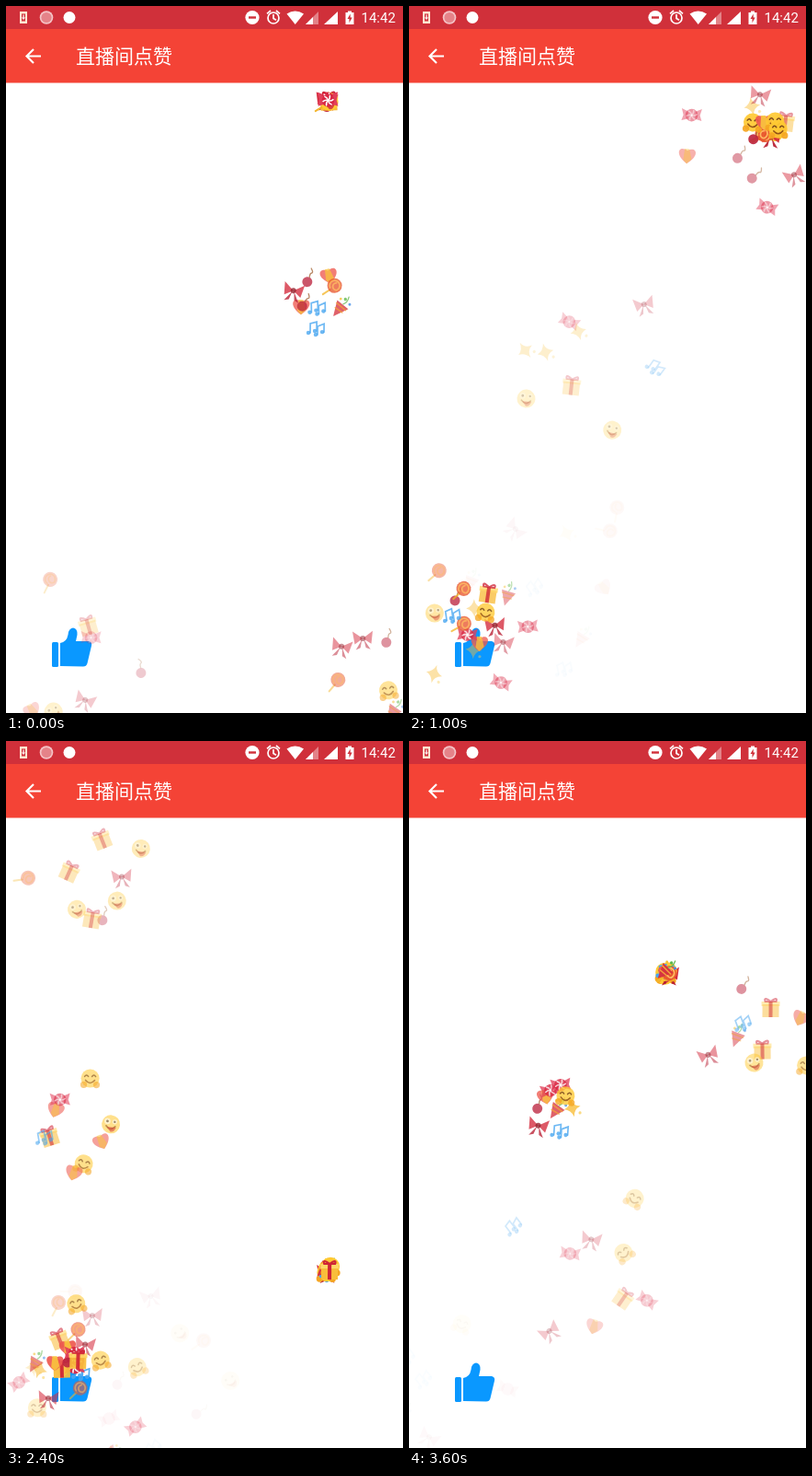
An HTML page with a canvas that plays this animation: 432 by 768 pixels, repeating every 3.7 s.

```html
<!DOCTYPE html>
<html lang="zh">
<head>
<meta charset="utf-8">
<title>直播间点赞</title>
<style>
  html, body { margin: 0; width: 432px; height: 768px; overflow: hidden; background: #fff; }
  svg, canvas { position: absolute; left: 0; top: 0; display: block; }
  .clock { font: 15px Roboto, sans-serif; }
  .title { font: 21px "Noto Sans CJK SC", "Noto Sans CJK", sans-serif; }
</style>
</head>
<body>
<svg width="432" height="768" viewBox="0 0 432 768">
  <rect width="432" height="83.500" fill="#f44336"/>
  <rect width="432" height="25" fill="#d0303a"/>
  <g fill="#fff">
    <path d="M15 6h8v13h-8z M17 8.500v8h4v-8z" fill="#ffe9d2" fill-rule="evenodd"/>
    <path d="M18.400 9.500h1.200v3h1.500L19 15l-2.100-2.500h1.500z"/>
    <circle cx="44" cy="12.500" r="7.300" fill="#f4c3c6"/>
    <circle cx="44" cy="12.500" r="5.600" fill="#e58389"/>
    <circle cx="69" cy="12.500" r="6.500"/>
    <circle cx="268" cy="12.500" r="7.600"/>
    <path d="M264 11.300h8v2.400h-8z" fill="#d0303a"/>
    <g fill="none" stroke="#fff" stroke-width="1.700">
      <circle cx="291" cy="13" r="6"/>
      <path d="M291 9v4.500l3 1.800M284 8.300l4-3.300M298 8.300l-4-3.300"/>
    </g>
    <path d="M305.500 8.500Q314.500 2.500 324 8.500L314.700 20z"/>
    <path d="M326 20L340 6v14z" opacity=".4"/>
    <path d="M326 20l8-8v8z"/>
    <path d="M346 20L361 6v14z"/>
    <path d="M369.500 7h2.500V5.500h4V7h2.500v13h-9z"/>
    <path d="M374.700 8.500l-3.200 5.500h2v4.200l3.200-5.700h-2z" fill="#d0303a"/>
    <text class="clock" x="386.500" y="18">14:42</text>
    <text class="title" x="76" y="62">直播间点赞</text>
  </g>
  <path d="M38 54.500H23M30 47l-7.500 7.500L30 62" fill="none" stroke="#fff" stroke-width="2.200"/>
  <g fill="#0a98ff">
    <rect x="50" y="691" width="7" height="27" rx="1.500"/>
    <path d="M59 717V692Q66 691 67.500 683Q68 676 73 675.500Q78 676 77.500 683L76 690H90Q94 691 93 695L88.500 714Q87.500 717.500 84 717.500z"/>
  </g>
</svg>
<canvas id="stage" width="432" height="768"></canvas>
<script>
const LOOP = 3700, STEP = 100, LIFE = 850, FALL = 380, PIECES = 9;
const ctx = document.getElementById('stage').getContext('2d');

let seed = 41;
const rand = () => (seed = seed * 16807 % 2147483647) / 2147483647;
const spread = r => (rand() * 2 - 1) * r;

function dot(x, y, r, color) {
  ctx.fillStyle = color;
  ctx.beginPath();
  ctx.arc(x, y, r, 0, 7);
  ctx.fill();
}
function fill(d, color) {
  ctx.fillStyle = color;
  ctx.fill(new Path2D(d));
}
function line(d, color, width) {
  ctx.strokeStyle = color;
  ctx.lineWidth = width;
  ctx.stroke(new Path2D(d));
}
function face() {
  dot(0, 0, 10, '#ffc933');
  line('M-5 2Q0 8 5 2', '#8a4a16', 1.6);
}

const draw = {
  candy() {
    fill('M-4-4L-11-7L-9 0L-11 6L-4 4zM4-4L11-7L9 0L11 6L4 4z', '#e2405a');
    dot(0, 0, 6.8, '#d92843');
    for (let i = 0; i < 6; i++) {
      ctx.rotate(Math.PI / 3);
      line('M0 0Q3 1 5.500-1', '#fff', 1.5);
    }
  },
  lolly() {
    line('M-5 4L-13 9', '#f3b62c', 2);
    dot(0, 0, 8, '#e8572f');
    line('M-5 2A5.500 5.500 0 1 1 2 5A4 4 0 1 1 2-3', '#ffbd63', 1.8);
  },
  smile() {
    face();
    line('M-6-2Q-4-5-2-2M2-2Q4-5 6-2', '#70401a', 1.5);
    dot(-7, 7, 3.6, '#f5a623');
    dot(7, 7, 3.6, '#f5a623');
  },
  goofy() {
    face();
    dot(-4, -3, 3.3, '#fff');
    dot(4, -3, 2.6, '#fff');
    dot(-4, -3, 1.4, '#53381f');
    dot(4, -3, 1.2, '#53381f');
    fill('M-4 3H6Q4 9 0 8z', '#d8433c');
  },
  gift() {
    fill('M-9-4H9V10H-9z', '#f9bd3b');
    fill('M-10-7H10V-2H-10z', '#ffd766');
    fill('M-2-7H2V10H-2z', '#cf2436');
    line('M0-7Q-8-13-6-7zM0-7Q8-13 6-7z', '#cf2436', 2);
  },
  heart() {
    fill('M0 9C-15-1-9-11 0-5C9-11 15-1 0 9z', '#ee5a50');
    fill('M-3-7H2L5 4L0 9L-4 5z', '#f8c33f');
  },
  balloon() {
    dot(-2, 4, 5.5, '#bd2740');
    line('M1-1Q2-5 4-5T4-10', '#a5683c', 1.3);
  },
  notes() {
    line('M-6 6V-4L1-6V4M2 8V-1L9-4V5', '#47a5f0', 1.7);
    for (const [x, y] of [[-8, 6], [-1, 4], [0, 8], [7, 5]]) dot(x, y, 2.2, '#47a5f0');
  },
  bow() {
    fill('M0-1L-11-9L-9 5zM0-1L11-9L9 5z', '#d42a3c');
    fill('M-1 0L-8 11L-3 9zM1 0L8 11L3 9z', '#b91f33');
    dot(0, -1, 3, '#93202c');
  },
  popper() {
    fill('M-9 9L-3-8L8 3z', '#d63440');
    line('M-6 0L1 6M-4-5L5 4', '#f3a13b', 1.5);
    dot(6, -8, 1.7, '#5db84d');
    dot(10, -2, 1.5, '#438ee8');
    dot(1, -9, 1.4, '#f4bd2e');
    line('M3-3Q8-4 10-10', '#6bb956', 1.3);
  },
  sparkle() {
    fill('M0-10Q1-2 9 0Q1 2 0 10Q-2 2-9 0Q-2-2 0-10z', '#f8bd36');
    dot(7, 7, 1.6, '#f8d060');
  }
};
const kinds = Object.keys(draw);
const pieces = [];

// Pieces leave (x, y) in every direction, lifted upwards; `top` covers the pile.
function burst(birth, x, y, top, lift = 100) {
  for (let i = 0; i < PIECES; i++) {
    const angle = (i + rand()) / PIECES * Math.PI * 2;
    const speed = 40 + rand() * 130;
    const kind = i === PIECES - 1 ? top : kinds[Math.floor(rand() * kinds.length)];
    pieces.push({
      birth, kind,
      x: x + spread(3),
      y: y + spread(3),
      vx: Math.cos(angle) * speed,
      vy: Math.sin(angle) * speed - lift,
      spin: spread(1.1)
    });
  }
}

// Taps around the screen: time, place and the piece on top.
burst(-400, 410, 685, 'gift');
burst(-200, 335, 325, 'lolly');
burst(-20, 350, 105, 'candy');
burst(200, 170, 440, 'lolly');
burst(400, 174, 310, 'bow');
burst(580, 371, 125, 'gift');
burst(900, 390, 140, 'smile');
burst(1100, 213, 440, 'popper');
burst(1290, 251, 606, 'smile');
burst(1600, 175, 520, 'lolly');
burst(1880, 99, 116, 'bow');
burst(2050, 70, 405, 'goofy');
burst(2380, 350, 576, 'gift');
burst(2550, 110, 235, 'candy');
burst(2790, 29, 554, 'candy');
burst(3000, 205, 490, 'smile');
burst(3200, 375, 300, 'heart');
burst(3400, 158, 395, 'smile');
burst(3590, 280, 253, 'popper');

// The like button: one early tap, then a steady run.
const like = (birth, top) => burst(birth, 70, 688, top, 200);
like(-600, 'candy');
for (let i = 0; i < 9; i++) like(550 + i * 250, ['candy', 'smile', 'bow', 'gift'][i % 4]);

function render(ms) {
  ctx.clearRect(0, 0, 432, 768);
  ctx.lineCap = 'round';
  for (const p of pieces) {
    const age = ms - p.birth;
    if (age < 0 || age >= LIFE) continue;
    const t = age / 1000;
    ctx.save();
    ctx.globalAlpha = Math.min(1, (LIFE - age) / 800) ** 1.2;
    ctx.translate(p.x + p.vx * t, p.y + p.vy * t + FALL * t * t);
    ctx.rotate(p.spin * t);
    draw[p.kind]();
    ctx.restore();
  }
}

const start = performance.now();
function tick() {
  const ms = (performance.now() - start) % LOOP;
  render(Math.floor(ms / STEP) * STEP);
  requestAnimationFrame(tick);
}
tick();
</script>
</body>
</html>
```
